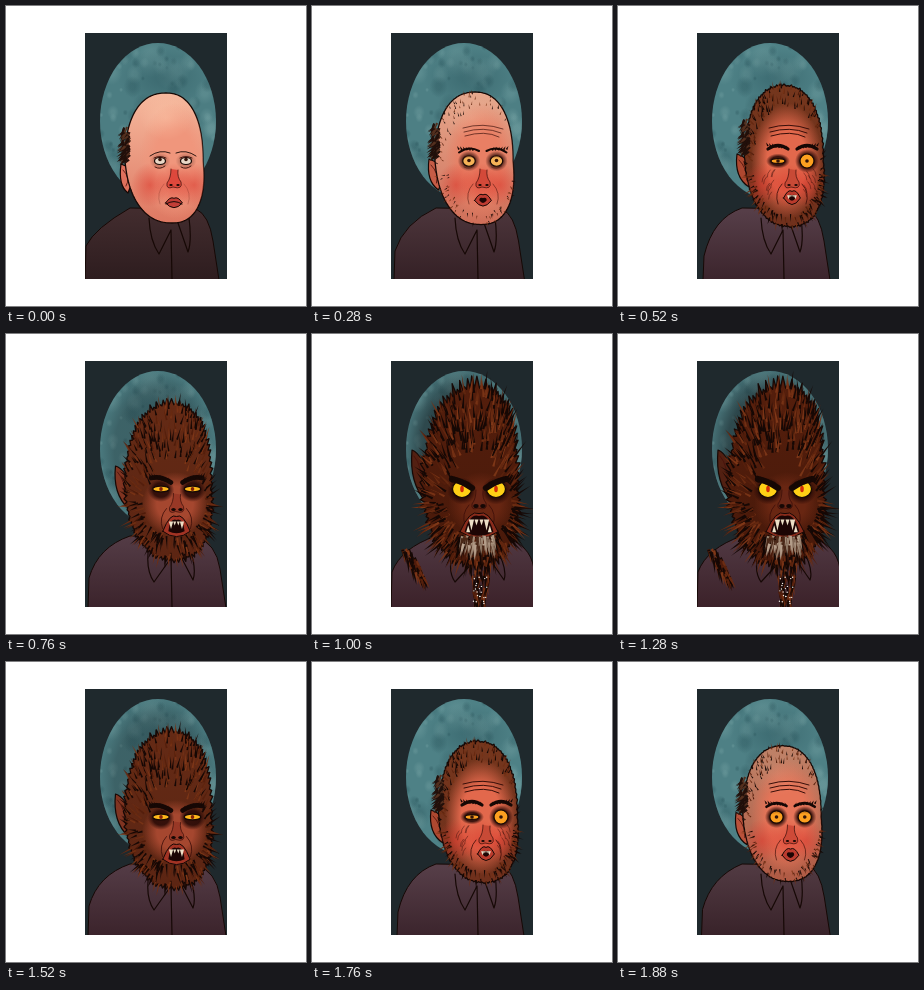
These frames come from a looping animation (300 by 300 pixels, 2000 ms). An HTML page with a canvas:

```html
<!DOCTYPE html>
<html lang="en">
<head>
<meta charset="utf-8">
<title>Full moon</title>
<style>
html, body { margin: 0; width: 100%; height: 100%; overflow: hidden; background: #fff; }
canvas { display: block; width: 100vw; height: 100vh; }
</style>
</head>
<body>
<canvas id="stage" width="300" height="300"></canvas>
<script>
const c = document.getElementById('stage').getContext('2d');
const INK = '#160805';
let q, wake, turn, wild, seed;   // pose number and progress of each phase

const rand = () => (seed = seed * 16807 % 2147483647) / 2147483647;
const clamp = v => Math.max(0, Math.min(1, v));
const mix = (a, b, u) => Array.isArray(a) ? a.map((v, i) => mix(v, b[i], u)) : a + (b - a) * u;
const tri = (man, half, wolf) => q < 4 ? mix(man, half, turn) : mix(half, wolf, wild);
const bump = (at, width) => clamp(1 - Math.abs(q - at) / width);
const rgb = (v, a = 1) => `rgba(${v.map(n => Math.round(clamp(n / 255) * 255))},${a})`;

function paint(d, fill, stroke, width = 1) {
  const p = d instanceof Path2D ? d : new Path2D(d);
  if (fill) { c.fillStyle = fill; c.fill(p); }
  if (stroke) { c.strokeStyle = stroke; c.lineWidth = width; c.stroke(p); }
}

function oval(x, y, rx, ry, fill, stroke, width) {
  const p = new Path2D();
  p.ellipse(x, y, rx, ry, 0, 0, 7);
  paint(p, fill, stroke, width);
}

function glow(x, y, rx, ry, color, alpha, core = 0) {
  c.save();
  c.translate(x, y);
  c.scale(rx, ry);
  const g = c.createRadialGradient(0, 0, core, 0, 0, 1);
  g.addColorStop(0, rgb(color, alpha));
  g.addColorStop(1, rgb(color, 0));
  oval(0, 0, 1, 1, g);
  c.restore();
}

function shade(y0, y1, from, to) {
  const g = c.createLinearGradient(0, y0, 0, y1);
  g.addColorStop(0, rgb(from));
  g.addColorStop(1, rgb(to));
  return g;
}

function hair(x, y, angle, len, width, color) {
  const dx = Math.cos(angle), dy = Math.sin(angle);
  paint(`M${x - dy * width} ${y + dx * width}L${x + dx * len} ${y + dy * len} ${x + dy * width} ${y - dx * width}Z`, color);
}

const furColor = () => rand() < .5 ? INK : rgb(mix([78, 27, 10], [128, 56, 24], rand()));

function moon() {
  const x = 152, y = 115, rx = 58, ry = 78;
  c.save();
  c.beginPath();
  c.ellipse(x, y, rx, ry, 0, 0, 7);
  c.clip();
  c.fillStyle = rgb(tri([76, 125, 130], [78, 129, 134], [70, 112, 117]));
  c.fillRect(90, 30, 130, 170);
  seed = 77;
  for (let i = 0; i < 110; i++) {
    const r = 2 + rand() * rand() * 15;
    glow(94 + rand() * 116, 38 + rand() * 145, r, r * 1.2, i % 2 ? [40, 82, 89] : [120, 165, 166], .32, .3);
  }
  glow(158, 72, 46, 30, [38, 80, 88], .45);
  glow(x, y, rx, ry, [30, 46, 50], .6 * wild, .75);
  c.restore();
}

function shirt() {
  const lx = tri(80, 86, 80), ly = tri(240, 250, 238), rx = tri(207, 206, 222);
  paint(`M${lx - 1} 274L${lx} ${ly}Q${lx + 9} ${ly - tri(18, 38, 24)} 124 202L190 203Q${rx - 4} 209 ${rx} 235L${rx + 6} 274Z`,
    shade(205, 272, tri([66, 44, 46], [86, 62, 72], [80, 56, 66]), tri([46, 29, 31], [60, 37, 45], [60, 34, 42])), INK);
  const open = wild * 10;
  paint(`M143 212Q${144 - open} 235 ${153 - open} 248L165 224 166 273M172 217L${182 + open} 246Q${186 + open} 235 183 212`, null, INK, 1.2);
}

function ear() {
  const [tx, ty] = tri([115, 158], [119, 148], [100, 116]);
  const [bx, by] = tri([122, 187], [131, 181], [114, 168]);
  paint(`M${tx} ${ty}Q${tx - 3} ${(ty + by) / 2 + 7} ${bx} ${by}L${bx + 6} ${by - 16}Q${tx + 10} ${ty + 3} ${tx} ${ty}Z`,
    rgb(tri([222, 112, 92], [174, 72, 48], [82, 32, 18])), INK, 1.2);
  paint(`M${tx + 2} ${ty + 6}Q${tx + 10} ${ty + 14} ${bx - 2} ${by - 7}`, null, 'rgba(70,15,10,.8)');
}

// Egg-shaped head whose crown, jaw and sides grow separately
function skull() {
  const top = q < 4 ? 87 - 7 * turn ** 3 : 80 - 26 * wild ** 1.5;
  const chin = tri(217, 220, 229), left = tri(119, 127, 112), right = tri(197, 205, 204);
  const x = tri(160, 166, 158), y = 155;
  const soft = v => Math.sign(v) * Math.abs(v) ** .86;
  return {
    left, top, chin,
    at(angle) {
      const a = soft(Math.cos(angle)), b = soft(Math.sin(angle)), up = Math.min(b, 0) ** 2;
      return [x + a * (a < 0 ? x - left : right - x) + up * 7 * wild + Math.max(b, 0) * 6, y + b * (b < 0 ? y - top : chin - y)];
    }
  };
}

function head() {
  const { at, left, top, chin } = skull();
  const cx = 166, cy = 165, spike = turn ** 4 * .02 + wild * .07;
  const path = new Path2D();
  seed = 41;
  for (let i = 0; i < 180; i++) {
    const [x, y] = at(i / 90 * Math.PI), k = i % 2 * spike * (.3 + rand());
    path.lineTo(x + (x - cx) * k, y + (y - cy) * k);
  }
  path.closePath();
  const brown = turn ** 3;
  paint(path, shade(top, chin,
    mix(mix([246, 185, 158], [116, 54, 29], brown), [84, 30, 12], wild),
    mix(mix([222, 120, 98], [112, 48, 28], brown), [72, 25, 10], wild)), INK, 1.3);

  // Bare skin shrinks towards the eyes and muzzle
  const mask = clamp(wild * 2);
  const fx = 169, fy = mix(155, 170, mask), fw = mix(36, 33, mask), fh = mix(58, 32, mask);
  c.save();
  c.clip(path);
  glow(fx, fy, fw, fh, tri([240, 150, 124], [226, 104, 76], [104, 38, 18]), 1, .55);
  const flush = 1 - mask;
  for (const x of [144, 168, 188]) glow(x, 179, 19, 22, [218, 58, 46], .6 * flush);
  glow(160, 112, 26, 22, [255, 205, 175], .4 * flush * (1 - turn));
  c.restore();

  // Hair sweeps outwards, straighter up on the crown
  seed = 905;
  const count = tri(0, 330, 680), inner = mix(.7, .42, mask), len = tri(1, 7, 17);
  for (let i = 0; i < count; i++) {
    const [ox, oy] = at(rand() * 7), s = Math.sqrt(mix(inner ** 2, 1, rand()));
    const x = cx + (ox - cx) * s, y = cy + (oy - cy) * s, size = .6 + rand() * .6, bend = (rand() - .5) * .5, color = furColor();
    if (Math.hypot((x - fx) / fw, (y - fy) / fh) < .92) continue;
    hair(x, y, Math.atan2(y - cy - (y < cy ? 25 : 0), x - cx) + bend, len * size, tri(.3, .7, 1.2), color);
  }

  // Sideburn
  seed = 12;
  for (let i = 0; i < 90 * (1 - mask); i++) {
    const y = rand() * 33;
    hair(left - 2 + rand() * 7, y + 121 - 8 * turn, 1.9 + rand() * .8, 8, 1.2, i % 4 ? '#22100b' : '#54301f');
  }
}

function eye(x, y, rx, ry, side) {
  glow(x, y + 2 * wild, rx + 5, ry + 5 + 4 * bump(6, 2), [40, 10, 6], .2 + .7 * wake, .6);
  const iris = mix(mix([232, 215, 198], [252, 160, 32], wake), [255, 208, 22], wild);
  oval(x, y, rx, ry, rgb(iris), INK, 1.2);
  oval(x, y - 1.5 * (1 - wake), 1.8, Math.min(ry * .7, 1.8 + 1.5 * wild), rgb(mix([50, 20, 10], [210, 45, 8], wild)));
  if (turn < 1) {
    const lid = `rgba(70,25,18,${1 - turn})`;
    paint(`M${x - 6} ${y - 3}Q${x} ${y - 6} ${x + 6} ${y - 3}M${x - 5} ${y + 6}Q${x} ${y + 9} ${x + 5} ${y + 5}`, null, lid);
  }
  // Brow slopes down towards the nose with rage
  const by = y - tri(8, 15, 8), drop = 3 * turn + 4 * wild;
  const outer = x - side * 10, slope = side * 20;
  paint(`M${outer} ${by + 3 - 5 * wild}Q${x} ${by - 4 * (1 - wild)} ${outer + slope} ${by + drop}`, null, INK, .9 + 2.3 * turn + 3 * wild);
  for (let i = 0; i < 8 * wake; i++)
    hair(outer + slope * i / 7, by + drop * i / 7, -1.57 - side * .5, 4 + 4 * wild, 1, INK);
}

function nose() {
  const [x, y] = tri([168, 175], [174, 175], [167, 168]);
  paint(`M${x - 3} ${y - 12}Q${x - 3} ${y - 3} ${x - 7} ${y + 2}Q${x - 8} ${y + 9} ${x - 1} ${y + 6}Q${x + 9} ${y + 9} ${x + 7} ${y + 1}Q${x + 3} ${y - 4} ${x + 4} ${y - 11}`,
    rgb(tri([222, 72, 60], [200, 74, 54], [104, 38, 22])), 'rgba(55,14,9,.7)');
  for (const dx of [-3, 4]) oval(x + dx, y + 4, 1.7 + wild, 1.1 + wild, INK);
  for (const side of [-1, 1])
    paint(`M${x + side * 10} ${y + 3}q${side * 8} 9 ${side * 4} 20`, null, `rgba(60,14,9,${.2 + .6 * turn})`);
}

function mouth() {
  const [x, y, w, h] = tri([168, 197, 8, 5], [174, 192, 8, 7], [167, 190, 18, 11]);
  const lip = rgb(tri([194, 62, 55], [186, 58, 44], [138, 44, 28]));
  // Lips round first, then droop at the corners into a snarl
  const sag = h * clamp(wild * 2) * .7;
  const ring = k => `M${x - w * k} ${y + sag}Q${x - w * .5} ${y - h * k * 1.3} ${x} ${y - h * k * .9}Q${x + w * .5} ${y - h * k * 1.3} ${x + w * k} ${y + sag}Q${x} ${y + h * 1.8 * k} ${x - w * k} ${y + sag}Z`;
  paint(ring(1.05), lip, INK);
  if (wake < .5) paint(`M${x - w} ${y + 1}Q${x} ${y - 4} ${x + w} ${y + 1}`, null, INK);
  else paint(ring(.45 + .35 * wild), '#1c0504');
  if (turn < 1) return;
  const tooth = (tx, ty, half, len) => paint(`M${tx - half} ${ty}h${half * 2}L${tx} ${ty + len}Z`, '#ecdfc6');
  for (const side of [-1, 1]) {
    tooth(x + side * w * .42, y - h * .4, 1.6 + wild, 4 + 7 * wild);
    tooth(x + side * w * .14, y - h * .4, 1 + wild, 2 + 4 * wild);
    if (wild > .6) tooth(x + side * w * .6, y + h * .75, 2, -7);
  }
}

function wrinkles() {
  const fade = wake * (1 - clamp(wild * 2));
  for (let i = 0; i < 3; i++)
    paint(`M${151 + i} ${122 + i * 4}q20 -6 ${40 - i * 3} 1`, null, `rgba(55,14,9,${fade})`);
  seed = 8;
  for (let i = 0; i < 22; i++) {
    const side = i % 2 ? 1 : -1;
    paint(`M${171 + side * (14 + rand() * 13)} ${162 + rand() * 32}q${side * 3} 3 ${side * 3} 7`, null, `rgba(55,14,9,${.7 * bump(4.5, 1.4)})`);
  }
}

function wildFur() {
  const grow = clamp(wild * 2 - 1);
  if (!grow) return;
  seed = 300;
  // Chest column
  for (let i = 0; i < 110; i++) {
    const s = rand();
    hair(168 + (rand() - .5) * mix(26, 9, s), 218 + s * 52, 1.3 + rand() * .5, 11 * grow, 1.3, furColor());
  }
  for (let i = 0; i < 22 * grow; i++) oval(161 + rand() * 14, 240 + rand() * 30, .7, .7, '#f3eee8');
  // Goatee
  for (let i = 0; i < 100; i++) {
    const x = 150 + rand() * 32;
    hair(x, 201 + rand() * 12, 1.57 + (167 - x) * .015, (7 + rand() * 9) * grow, 1.3, i % 3 ? rgb(mix([125, 100, 82], [190, 168, 148], rand())) : '#4a2818');
  }
  // Torn shoulder
  for (let i = 0; i < 80; i++) {
    const s = rand();
    hair(89 + s * 16 + rand() * 9, 215 + s * 30, 1 + rand() * .5, 13 * grow, 1.4, furColor());
  }
}

function draw(pose) {
  q = Math.min(pose, 8.5);
  wake = clamp(q / 3);
  turn = clamp(q / 4);
  wild = Math.max(0, (q - 4) / 4);
  c.fillStyle = '#fff';
  c.fillRect(0, 0, 300, 300);
  c.save();
  c.beginPath();
  c.rect(79, 27, 142, 246);
  c.clip();
  c.fillStyle = '#1f292d';
  c.fillRect(79, 27, 142, 246);
  c.lineCap = c.lineJoin = 'round';
  moon();
  shirt();
  ear();
  head();
  wrinkles();
  const squint = 1 - .62 * bump(6, 2), open = tri(3.5, 7, 8.5) * squint, wide = tri(5.5, 7, 9.5);
  eye(tri(154, 160, 150), 155, wide, open * (1 - .65 * bump(4, 1)), 1);
  eye(tri(180, 189, 184), 155, wide, open, -1);
  nose();
  mouth();
  wildFur();
  c.restore();
}

// Sixteen even steps on a 40 ms clock: up to the peak, then back
function poseAt(t) {
  const step = Math.floor(Math.floor(t / 40) * 40 / 125);
  return step < 10 ? step : 18 - step;
}

let shown = -1;
function tick() {
  const pose = poseAt(performance.now() % 2000);
  if (pose !== shown) draw(shown = pose);
  requestAnimationFrame(tick);
}
tick();
</script>
</body>
</html>
```
